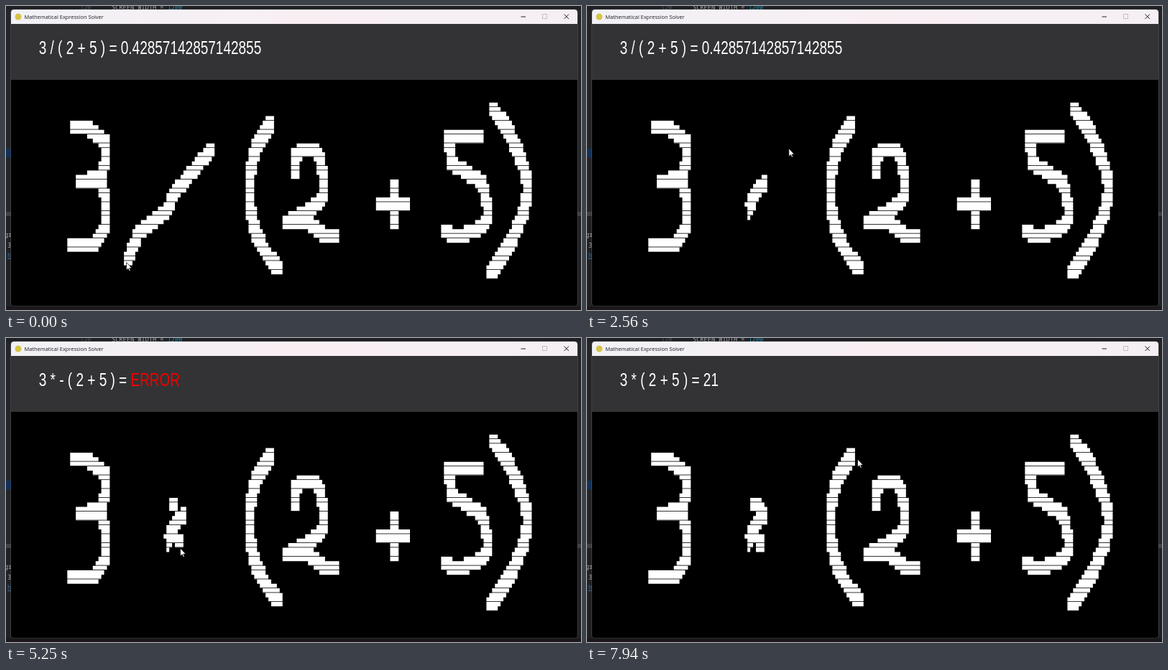
Animation of 800 by 424 pixels, one loop 8 s. Source, as an HTML page with a canvas:

```html
<!DOCTYPE html>
<html lang="en">
<head>
<meta charset="utf-8">
<title>Expression solver</title>
<style>
html, body { margin: 0; width: 100%; height: 100%; overflow: hidden; background: #1e1f22; }
canvas { display: block; }
</style>
</head>
<body>
<canvas id="stage" width="800" height="424"></canvas>
<script>
const ctx = document.getElementById('stage').getContext('2d');
const LOOP = 8000;
const COLS = 200, ROWS = 50;
const X0 = 6.5, Y0 = 103.1, CW = 3.94, CH = 6.307;
const grid = new Uint8Array(COLS * ROWS);

const ramp = (t, from, to) => Math.min(1, Math.max(0, (t - from) / (to - from)));
const mix = (a, b, f) => a + (b - a) * f;

// The brush covers 3 by 3 cells.
function dab(c, r) {
  c = Math.round(c);
  r = Math.round(r);
  for (let y = r - 1; y <= r + 1; y++) grid.fill(1, y * COLS + c - 1, y * COLS + c + 2);
}

function stroke(...points) {
  points.forEach(([c, r], i) => {
    const [pc, pr] = points[Math.max(0, i - 1)];
    const steps = Math.max(Math.abs(c - pc), Math.abs(r - pr), 1);
    for (let s = 0; s <= steps; s++) dab(mix(pc, c, s / steps), mix(pr, r, s / steps));
  });
}

// A bracket bows away from its middle by a power of the distance.
function bracket(col, mid, from, to, reach, span, power) {
  for (let r = from; r <= to; r += 0.25) {
    dab(col + reach * (Math.abs(r - mid) / span) ** power, r);
  }
}

function drawSymbols() {
  stroke([22, 10], [27, 10], [33, 13], [33, 18], [31, 21], [24, 22], [31, 22],
    [33, 26], [33, 32], [29, 36], [21, 36]);
  bracket(84, 24, 9, 41, 8.5, 16, 2.5);
  stroke([100, 20], [100, 16], [102, 15], [107, 15], [109, 17], [110, 22], [110, 25],
    [106, 28], [97, 31], [104, 31], [111, 34], [114, 34]);
  stroke([135, 23], [135, 31]);
  stroke([130, 27], [139, 27]);
  stroke([165, 12], [154, 12], [155, 18], [166, 22], [168, 28], [168, 30], [164, 33],
    [157, 34], [153, 33]);
  bracket(182, 23.5, 6, 42, -12.5, 18, 1.7);
}

// The slash is rubbed out from its foot up to the middle, then on to its top.
function drawSlash(t) {
  stroke([70, 15], [57, 25], [55, 28], [45, 33], [41, 39]);
  const low = mix(41, 27, ramp(t, 500, 1600));
  const high = mix(23, 13, ramp(t, 2070, 2500));
  for (let r = 14; r <= 40; r++) {
    if (r > low) grid.fill(0, r * COLS + 40, r * COLS + 55);
    if (r > high) grid.fill(0, r * COLS + (r < 21 ? 55 : 62), r * COLS + 74);
  }
}

function drawDot(t) {
  if (t > 4440) dab(57, 20);
  if (t > 4790) dab(59, 28);
  if (t > 6060) stroke([58, 20], [60, 22]);
  if (t > 6440) dab(59, 29);
}

function rect(x, y, w, h, color) {
  ctx.fillStyle = color;
  ctx.fillRect(x, y, w, h);
}

function label(str, x, y, font, color) {
  ctx.font = font;
  ctx.fillStyle = color;
  ctx.fillText(str, x, y);
}

function line(x0, y0, x1, y1, color) {
  ctx.beginPath();
  ctx.moveTo(x0, y0);
  ctx.lineTo(x1, y1);
  ctx.strokeStyle = color;
  ctx.lineWidth = 1;
  ctx.stroke();
}

function drawDesktop() {
  rect(0, 0, 800, 424, '#242528');
  rect(0, 0, 800, 5, '#1f2023');
  rect(0, 199, 7, 12, '#12305a');
  rect(0, 287, 800, 6, '#3e3f42');
  rect(0, 293, 800, 131, '#1f2023');
  rect(0, 419, 800, 5, '#1d181b');
  const mono = '8.65px "Noto Sans Mono", "DejaVu Sans Mono", monospace';
  label('120', 103, 5, mono, '#4b5059');
  label('SCREEN_WIDTH = ', 147, 5, mono, '#a9abb1');
  label('1200', 147 + ctx.measureText('SCREEN_WIDTH = ').width, 5, mono, '#2d87a8');
  label('gr', -2, 322, mono, '#a9abb1');
  label('3', 2, 337, mono, '#a9abb1');
  label('h', 2, 351, mono, '#3a6ba3');
  rect(2, 352, 5, 1, '#3a6ba3');
}

function drawWindow() {
  ctx.save();
  ctx.beginPath();
  ctx.roundRect(7, 5, 788, 414, 4);
  ctx.fillStyle = '#000';
  ctx.fill();
  ctx.clip();
  const bar = ctx.createLinearGradient(7, 0, 795, 0);
  bar.addColorStop(0, '#f1f1f6');
  bar.addColorStop(0.5, '#f8eff3');
  bar.addColorStop(1, '#f5eff3');
  rect(7, 5, 788, 20, bar);
  rect(7, 25, 788, 78, '#333335');
  ctx.restore();
  ctx.beginPath();
  ctx.roundRect(6.5, 4.5, 789, 414, 4);
  ctx.strokeStyle = 'rgba(120,120,124,0.35)';
  ctx.lineWidth = 1;
  ctx.stroke();

  ctx.beginPath();
  ctx.arc(17, 15, 4.5, 0, Math.PI * 2);
  ctx.fillStyle = '#d6c446';
  ctx.fill();
  label('Mathematical Expression Solver', 25.5, 17.8, '7.45px "Open Sans", sans-serif', '#1d1b1e');
  line(716.5, 15, 723, 15, '#222');
  line(776.5, 11.5, 783, 18, '#222');
  line(783, 11.5, 776.5, 18, '#222');
  ctx.strokeStyle = '#c4bfc3';
  ctx.strokeRect(746.5, 11.5, 6, 6);
}

const texts = [
  [0, '3 / ( 2 + 5 ) = ', '0.42857142857142855'],
  [2740, '3 + ( 2 + 5 ) = ', '10'],
  [5060, '3 * - ( 2 + 5 ) = ', 'ERROR'],
  [6100, '3 * ( 2 + 5 ) = ', '21']];

function drawText(t) {
  const [, expr, result] = texts.filter(e => e[0] <= t).pop();
  const font = '25px "Liberation Sans", Arial, sans-serif';
  ctx.save();
  ctx.translate(45.7, 67.3);
  ctx.scale(0.76, 1); // narrow face
  label(expr, 0, 0, font, '#fff');
  label(result, ctx.measureText(expr).width, 0, font, result === 'ERROR' ? '#f00000' : '#fff');
  ctx.restore();
}

function drawGrid() {
  ctx.beginPath();
  for (let r = 0; r < ROWS; r++) {
    for (let c = 0; c < COLS; c++) {
      if (grid[r * COLS + c]) ctx.rect(X0 + c * CW, Y0 + r * CH, CW, CH);
    }
  }
  ctx.fillStyle = '#fff';
  ctx.fill();
  // rows are 9.605 units apart but 9 high, so rounding leaves hairline gaps
  for (let r = 1; r < ROWS; r++) {
    if ((r * 0.605 + 0.94) % 1 < 0.605) rect(8, Y0 + r * CH - 0.8, 786, 0.8, '#000');
  }
}

// Pointer moves: [start, end, x, y]
const moves = [
  [500, 1600, 222, 288], [1600, 2000, 255.5, 229.5], [2070, 2500, 284, 193],
  [2500, 2810, 268, 222], [2880, 3380, 234.5, 298], [3500, 4310, 233.5, 236.5],
  [4380, 4480, 233, 231], [4480, 5250, 242.5, 293], [5250, 5560, 240, 338],
  [5560, 6000, 238, 229], [6250, 6690, 248.5, 325], [7440, 7940, 376.5, 169]];

function drawPointer(t) {
  let x = 167.5, y = 357.5;
  for (const [from, to, nx, ny] of moves) {
    const f = ramp(t, from, to);
    x = mix(x, nx, f);
    y = mix(y, ny, f);
  }
  ctx.save();
  ctx.translate(x, y);
  const arrow = new Path2D('M0 0V11L2.5 8.7L4.2 12.3L5.8 11.6L4.2 8.2H7.6Z');
  ctx.fillStyle = '#fff';
  ctx.fill(arrow);
  ctx.strokeStyle = '#000';
  ctx.lineWidth = 0.7;
  ctx.stroke(arrow);
  ctx.restore();
}

const start = performance.now();
function frame() {
  const t = (performance.now() - start) % LOOP;
  grid.fill(0);
  drawSymbols();
  drawSlash(t);
  drawDot(t);
  drawDesktop();
  drawWindow();
  drawText(t);
  drawGrid();
  drawPointer(t);
  requestAnimationFrame(frame);
}
frame();
</script>
</body>
</html>
```
